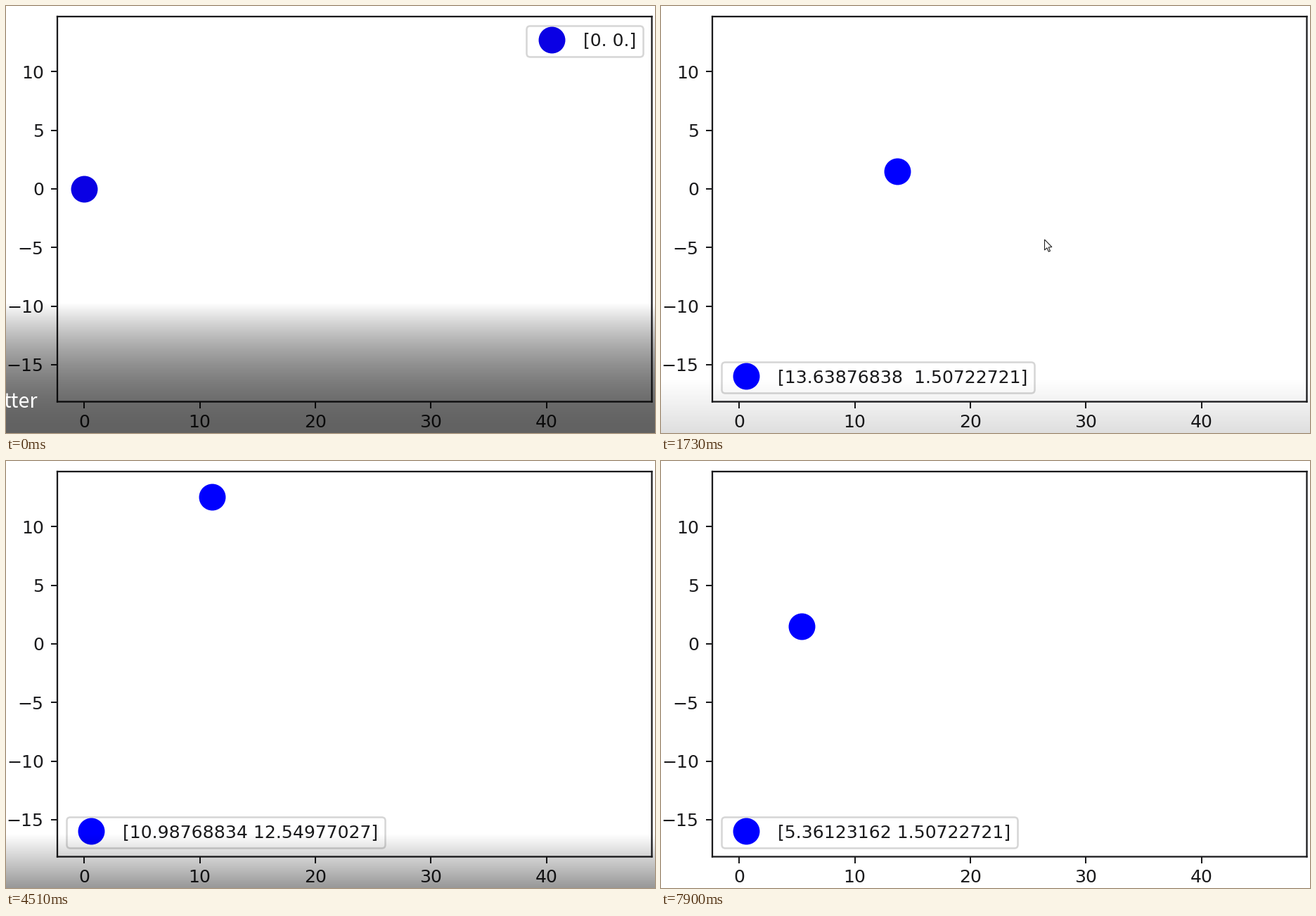
Animation, 923 px wide and 607 px high, one loop 8000 ms. Source, as a matplotlib script:

```python
import numpy as np
import matplotlib.pyplot as plt
from matplotlib.animation import FuncAnimation
from matplotlib.patches import Polygon

W, H = 923, 607
STEP, FRAMES = 40, 200
SCALE = 1.82                       # plot enlarged from default point sizes
LEFT, RIGHT, TOP, BOTTOM = 73, 918.5, 15, 562.5
PLAY = 790                         # ms at which the walk resumes
INK = "#1a1a1c"

plt.rcParams.update({
    "font.family": "DejaVu Sans",
    "font.size": 9.92 * SCALE,
    "axes.linewidth": 0.9 * SCALE,
    "axes.edgecolor": INK,
    "text.color": INK,
    "patch.linewidth": SCALE,
    "legend.fontsize": 9.92 * SCALE,
})
for side, pad in (("xtick", 3.5), ("ytick", 4.1)):
    plt.rcParams.update({
        side + ".major.size": 3.5 * SCALE,
        side + ".major.width": 0.8 * SCALE,
        side + ".major.pad": pad * SCALE,
        side + ".color": INK,
    })

# Ten unit steps straight ahead, then a 9 degree left turn before each step.
heading = np.radians(9 * np.maximum(np.arange(1, 51) - 10, 0))
path = np.zeros((51, 2))
path[1:, 0] = np.cumsum(np.cos(heading))
path[1:, 1] = np.cumsum(np.sin(heading))

fig = plt.figure(figsize=(W / 100, H / 100), dpi=100, facecolor="white")
ax = fig.add_axes([LEFT / W, 1 - BOTTOM / H,
                   (RIGHT - LEFT) / W, (BOTTOM - TOP) / H])
ax.set_xlim(-2.33, 49.12)
ax.set_ylim(-18.15, 14.69)
ax.set_xticks(range(0, 50, 10))
ax.set_yticks(range(-15, 15, 5))
for spine in ax.spines.values():
    spine.set_snap(False)
ball, = ax.plot([0], [0], "o", color="blue", ms=14 * SCALE, mew=SCALE)

top = fig.add_axes([0, 0, 1, 1], zorder=5)
shade = top.imshow(np.zeros((H, 1, 4)), extent=(0, W, H, 0),
                   aspect="auto", interpolation="nearest")
top.set_xlim(0, W)
top.set_ylim(H, 0)
top.axis("off")
caption = top.text(44.5, 571, "tter", color="white", ha="right",
                   va="baseline", fontsize=20.5,
                   fontfamily="Noto Sans CJK JP")
arrow = np.array([(0, 0), (0, 15), (3.4, 11.8), (5.8, 17.2),
                  (8, 16.2), (5.7, 11), (10.4, 10.6)])
cursor = top.add_patch(Polygon(arrow + (545.5, 332), facecolor="white",
                               edgecolor="#222222", linewidth=0.8))
rows = np.arange(H) + 0.5


def ramp(t, start, end):
    return np.clip((t - start) / (end - start), 0, 1)


def snap(p):
    """Move a point to the coarse pixel grid of the unscaled plot."""
    grid = np.array([6.507, 6.621])
    return np.round(p * grid + 0.3) / grid


def draw_shade(veil, bar):
    edge = 530 - 108 * veil
    dark = 0.62 * np.sqrt(veil) + 0.41 * bar
    u = np.clip((rows - edge) / (H - edge), 0, 1)
    rgba = np.zeros((H, 1, 4))
    rgba[:, 0, 3] = dark * (1 - (1 - u) ** (1 + 0.9 * veil))
    shade.set_data(rgba)


def update(n):
    t = n * STEP + 30
    k = int((t + 1095) // 200) if t >= PLAY else 0
    x, y = snap(path[k])
    ball.set_data([x], [y])
    ball.set_color("blue" if t >= PLAY else "#0a00e4")
    ball.set_label(str(path[k]))
    ax.legend(loc="upper right" if k <= 10 else "lower left")

    veil = 1 - ramp(t, PLAY, 1150)
    draw_shade(veil, ramp(t, 1670, 1920) - ramp(t, 6810, 7150))
    caption.set_alpha(veil)
    cursor.set_visible(1640 <= t < 2200)
    return ball, shade, caption, cursor


anim = FuncAnimation(fig, update, frames=FRAMES, interval=STEP,
                     init_func=lambda: update(0), repeat=True,
                     repeat_delay=0, blit=False)
plt.show()
```
